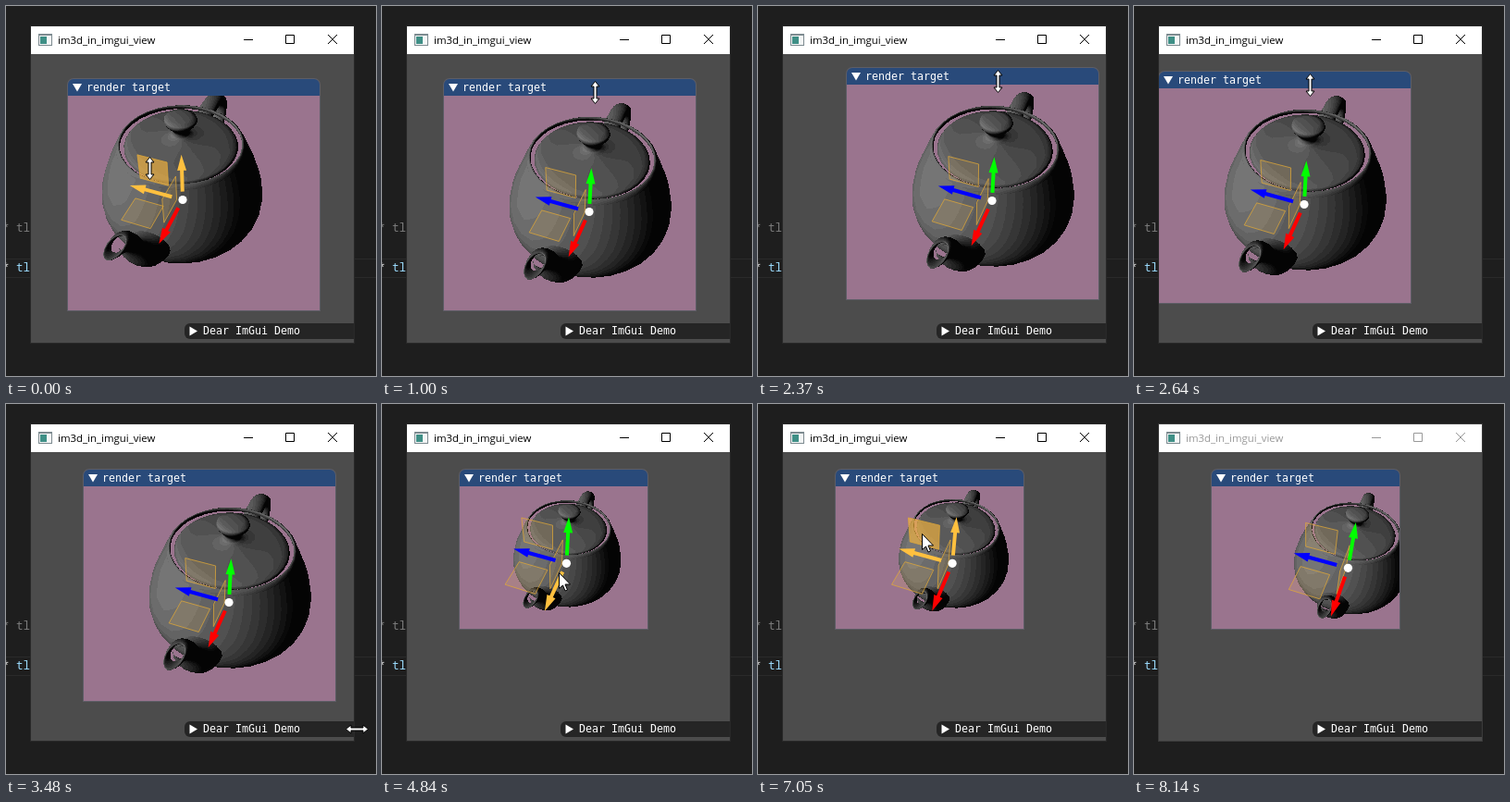
Animation of 400x400 px, one loop 8240 ms. Source, as an HTML page with a canvas:

```html
<!DOCTYPE html>
<html lang="en">
<head>
<meta charset="utf-8">
<title>im3d_in_imgui_view</title>
<style>
html, body { margin: 0; width: 100%; height: 100%; overflow: hidden; background: #1e1e1e; }
#stage { position: relative; width: 400px; height: 400px; overflow: hidden; background: #1e1e1e; }
#stage div, #stage svg, canvas { position: absolute; }
.code { left: -4px; font: 12.5px/20px "Noto Sans Mono", monospace; white-space: pre; color: #d4d4d4; }
.code b { font-weight: 400; color: #9cdcfe; }
.dim { color: #7c7c7c; }
#line { left: -2px; top: 273px; width: 404px; height: 19px; border: 1px solid #2a2a2a; }
#win { left: 27px; top: 22px; width: 349px; height: 342px; background: #4c4c4c; box-shadow: 0 0 0 1px #2a2a2a; }
#bar { left: 0; top: 0; width: 349px; height: 30px; background: #fff; color: #000; }
#bar div { left: 29px; top: 0; font: 11.4px/30px "Open Sans", sans-serif; white-space: nowrap; }
#win.idle { box-shadow: 0 0 0 1px #3c3c3c; }
#win.idle #bar { color: #999; }
#client { left: 0; top: 30px; width: 349px; height: 312px; overflow: hidden; }
.ui { font: 11.63px/18px "DejaVu Sans Mono", monospace; color: #fff; white-space: nowrap; }
#panel { border-radius: 6px 6px 0 0; overflow: hidden; background: #294a7a; box-shadow: 0 0 0 1px rgba(110, 110, 128, .5); }
#panel canvas { left: 0; top: 18px; }
#panel div, #demo div { left: 20px; top: 0; }
#demo { left: 166px; top: 291px; width: 220px; height: 17px; line-height: 17px; border-radius: 6px; background: #252525; }
.tri { left: 0; top: 0; fill: #fff; }
#cursor { left: 0; top: 0; }
</style>
</head>
<body>
<div id="stage">
  <div id="line"></div>
  <div class="code dim" style="top:230px">* tl</div>
  <div class="code" style="top:273px">* <b>tl</b></div>
  <div id="win">
    <div id="bar">
      <svg width="349" height="30" fill="none" stroke="currentColor">
        <g stroke="none">
          <path fill="#7d8b90" d="M8 8h15v13h-15z"/>
          <path fill="#f4f6f6" d="M9 10h13v10h-13z"/>
          <path fill="#3f8f86" d="M10 11h7v8h-7z"/>
        </g>
        <path d="M230 14.5h10M275.5 9.5h9v9h-9zM321 9l10 10M331 9l-10 10"/>
      </svg>
      <div>im3d_in_imgui_view</div>
    </div>
    <div id="client">
      <div id="panel" class="ui">
        <svg class="tri" width="18" height="18"><path d="M5 5h10l-5 8.5z"/></svg>
        <div>render target</div>
        <canvas id="view"></canvas>
      </div>
      <div id="demo" class="ui">
        <svg class="tri" width="18" height="17"><path d="M5.5 3.5v10l8.5-5z"/></svg>
        <div>Dear ImGui Demo</div>
      </div>
    </div>
  </div>
  <svg id="cursor" width="400" height="400"><path id="hand" fill="#fff" stroke="#000"/></svg>
</div>
<script>
const LOOP = 8240, IDLE = 8140, STEP = 90, TITLE = 18, FULL = 232;
const $ = id => document.getElementById(id);

// Mouse strokes: first and last update, what is dragged, distance, changes of hover and pointer.
const STROKES = [
  [180, 630, "pot", 33, 13],
  [720, 1000, "", 42, -95, { hover: "" }],
  [1090, 1450, "panel", 65, -2],
  [1540, 1770, "panel", -4, -5],
  [1860, 2130, "panel", -11, -17],
  [2280, 2370, "panel", -21, 12],
  [2460, 2640, "panel", -69, 4],
  [2820, 3120, "panel", 57, 0],
  [3210, 3480, "", 132, 266, { shape: "ew" }],
  [3570, 3840, "", -22, -30, { shape: "nwse" }],
  [4210, 4480, "size", -69, -78],
  [4660, 4840, "", -97, -61, { shape: "arrow", hover: "x" }],
  [4930, 5020, "", -3, -8, { hover: "z" }],
  [5200, 5470, "pot", -52, -16],
  [5650, 5830, "pot", 35, 11],
  [5920, 6050, "pot", -15, -5],
  [6140, 6230, "", 4, -22],
  [6510, 6780, "", -26, -12, { hover: "yz" }],
  [6960, 7140, "pot", 64, 15],
  [7420, 7800, "", 172, 268, { hover: "" }]
];

// Replays all strokes up to time t; the pot is kept in units of the full-size panel.
function stateAt(t) {
  const s = { cursor: [155, 175], panel: [67, 79], size: [272, 250], pot: [-12, -3.5],
    hover: "yz", shape: "ns", idle: t >= IDLE };
  for (const [from, to, what, dx, dy, change] of STROKES) {
    if (t < from) break;
    const gaps = Math.round((to - from) / STEP);
    const done = Math.min(1, (Math.floor((t - from) * gaps / (to - from) + 1e-6) + 1) / (gaps + 1));
    const scale = what === "pot" ? (s.size[1] - TITLE) / FULL : 1;
    const move = (p, k) => [p[0] + dx * done / k, p[1] + dy * done / k];
    s.cursor = move(s.cursor, 1);
    if (what) s[what] = move(s[what], scale);
    Object.assign(s, change);
  }
  return s;
}

// Camera
const DIST = 450, YAW = 20.5 * Math.PI / 180, PITCH = 47 * Math.PI / 180;
const sa = Math.sin(YAW), ca = Math.cos(YAW), sp = Math.sin(PITCH), cp = Math.cos(PITCH);
const LIGHT = [-.65, .15, .75];
function toView([x, y, z]) {
  const h = ca * x - sa * z;
  return [-sa * x - ca * z, cp * y - sp * h, sp * y + cp * h];
}
// Point of the plane x = 0 seen at a given offset from the view centre.
function unproject([ox, oy]) {
  let v = [0, 0, 0];
  for (let i = 0; i < 5; i++) {
    const q = 1 - v[2] / DIST, z = -ox * q / ca;
    v = toView([0, (-oy * q - sp * sa * z) / cp, z]);
  }
  return v;
}

// Teapot
const UNIT = 42.4, BASE = .58;
const verts = [], tris = [];
const sub = (a, b) => a.map((v, i) => v - b[i]);
const cross = (a, b) => [a[1] * b[2] - a[2] * b[1], a[2] * b[0] - a[0] * b[2], a[0] * b[1] - a[1] * b[0]];
const bez = (c, t) => [0, 1].map(k => {
  const s = 1 - t;
  return s * s * s * c[0][k] + 3 * s * s * t * c[1][k] + 3 * s * t * t * c[2][k] + t * t * t * c[3][k];
});

function surface(at, nu, nv) {
  const start = verts.length, e = 1e-4, row = nv + 1;
  for (let i = 0; i <= nu; i++) for (let j = 0; j <= nv; j++) {
    const u = i / nu, v = j / nv, p = at(u, v);
    const n = toView(cross(sub(at(u, v + e), p), sub(at(u + e, v), p)));
    const lit = n.reduce((s, c, k) => s + c * LIGHT[k], 0) / (Math.hypot(...n) || 1);
    const [x, y, z] = toView([p[0] * UNIT, (p[1] - BASE) * UNIT, p[2] * UNIT]);
    verts.push({ x, y, z, lit });
    if (i < nu && j < nv) {
      const a = start + i * row + j, b = a + row;
      tris.push([a, a + 1, b + 1], [a, b + 1, b]);
    }
  }
}
function lathe(steps, ...curve) {
  surface((u, v) => {
    const [r, y] = bez(curve, u), th = v * 2 * Math.PI;
    return [(r + .001) * Math.cos(th), y, (r + .001) * Math.sin(th)];
  }, steps, 32);
}
function tube(w0, w1, inner, outer) {
  surface((u, v) => {
    const a = bez(inner, u), b = bez(outer, u), th = v * 2 * Math.PI, c = Math.cos(th);
    const mix = k => (a[k] + b[k]) / 2 + (b[k] - a[k]) / 2 * c;
    return [mix(0), mix(1), -(w0 + (w1 - w0) * u) * Math.sin(th)];
  }, 14, 16);
}
lathe(6, [1.38, 2.4], [1.32, 2.53], [1.41, 2.53], [1.46, 2.4]);  // rim
lathe(16, [1.46, 2.4], [1.93, 1.5], [2.35, .5], [1.5, .15]);     // body
lathe(8, [0, 3.15], [.8, 3.15], [0, 2.85], [.2, 2.7]);           // knob
lathe(8, [.2, 2.7], [.4, 2.55], [1.28, 2.55], [1.28, 2.4]);      // lid
tube(.22, .22, [[-1.6, 2.025], [-3.05, 2.1], [-3.05, 1.3], [-2, .9]],
  [[-1.5, 2.25], [-3.5, 2.5], [-3.4, 1.05], [-1.9, .6]]);        // handle
tube(.5, .2, [[1.7, 1.425], [2.6, 1.425], [2.3, 2.1], [2.7, 2.4]],
  [[1.7, .6], [3.1, .825], [2.4, 2.025], [3.3, 2.4]]);           // spout
tube(.2, .12, [[2.7, 2.4], [2.8, 2.475], [2.9, 2.475], [2.8, 2.4]],
  [[3.3, 2.4], [3.525, 2.494], [3.45, 2.5125], [3.2, 2.4]]);     // lip

const view = $("view"), ctx = view.getContext("2d");
const grey = g => (255 << 24 | g << 16 | g << 8 | g) >>> 0;
const PINK = 0xff8e749a;

function drawPot(pos, project, W, H) {
  const img = ctx.createImageData(W, H);
  const px = new Uint32Array(img.data.buffer).fill(PINK), near = new Float32Array(W * H);
  const pts = verts.map(v => project([v.x + pos[0], v.y + pos[1], v.z + pos[2]]));
  for (const [i, j, k] of tris) {
    const a = pts[i], b = pts[j], c = pts[k];
    const bx = b[0] - a[0], by = b[1] - a[1], cx = c[0] - a[0], cy = c[1] - a[1];
    const area = bx * cy - by * cx;
    if (area >= 0) continue; // facing away
    const range = (n, max) => [Math.max(0, Math.floor(Math.min(a[n], b[n], c[n]))),
      Math.min(max - 1, Math.max(a[n], b[n], c[n]))];
    const [x0, x1] = range(0, W), [y0, y1] = range(1, H);
    const la = verts[i].lit, lb = verts[j].lit - la, lc = verts[k].lit - la;
    for (let y = y0; y <= y1; y++) for (let x = x0; x <= x1; x++) {
      const dx = x + .5 - a[0], dy = y + .5 - a[1];
      const s = (dx * cy - dy * cx) / area, t = (bx * dy - by * dx) / area;
      if (s < 0 || t < 0 || s + t > 1) continue;
      const d = a[2] + s * (b[2] - a[2]) + t * (c[2] - a[2]), o = y * W + x;
      if (d <= near[o]) continue;
      near[o] = d;
      px[o] = grey(Math.max(4, Math.floor((la + s * lb + t * lc) * 125 / 9) * 9));
    }
  }
  ctx.putImageData(img, 0, 0);
}

// Move gizmo, constant size on screen
const AXES = { x: [1, 0, 0], y: [0, 1, 0], z: [0, 0, 1] };
const TINT = { x: "#f00", y: "#0f0", z: "#00f" }, GOLD = "#ffc03f";

function drawGizmo(pos, project, hover) {
  const o = project(pos), size = 63.5 / o[2];
  const at = (...parts) => {
    const w = [0, 0, 0];
    for (const [axis, f] of parts) AXES[axis].forEach((v, k) => w[k] += v * f * size);
    return project(toView(w).map((v, k) => v + pos[k]));
  };
  const fill = (points, style) => {
    ctx.beginPath();
    for (const p of points) ctx.lineTo(p[0], p[1]);
    ctx.closePath();
    ctx.fillStyle = style;
    ctx.fill();
  };
  const lo = .25, hi = .77;
  for (const [a, b] of ["xz", "xy", "yz"]) {
    const quad = [[lo, lo], [hi, lo], [hi, hi], [lo, hi]].map(([f, g]) => at([a, f], [b, g]));
    fill(quad, hover === a + b ? "rgba(255,186,60,.62)" : "rgba(255,200,90,.14)");
    ctx.strokeStyle = "rgba(225,168,55,.75)";
    ctx.lineWidth = 1;
    ctx.stroke();
  }
  for (const axis of "zyx") {
    const s = at([axis, .2]), e = at([axis, 1]);
    const len = Math.hypot(e[0] - s[0], e[1] - s[1]), ux = (e[0] - s[0]) / len, uy = (e[1] - s[1]) / len;
    const pt = (d, n) => [s[0] + ux * d - uy * n, s[1] + uy * d + ux * n];
    const neck = len - 17;
    fill([pt(0, 2), pt(neck, 2), pt(neck, 5), pt(len, 0), pt(neck, -5), pt(neck, -2), pt(0, -2)],
      hover.includes(axis) ? GOLD : TINT[axis]);
  }
  ctx.beginPath();
  ctx.arc(o[0], o[1], 4.6, 0, 7);
  ctx.fillStyle = "#fff";
  ctx.fill();
}

const TURN = { ns: 0, ew: 90, nwse: -45, arrow: 0 };
const DOUBLE = "M0-12L4.5-6.5H1.5V6.5H4.5L0 12L-4.5 6.5H-1.5V-6.5H-4.5Z";
const ARROW = "M0 0V17L4 13.5L6.5 19.5L9 18.5L6.5 12.5H12Z";

function draw(s) {
  const [x, y] = s.panel.map(Math.round), [W, h] = s.size.map(Math.round), H = h - TITLE;
  Object.assign($("panel").style, { left: x - 27 + "px", top: y - 52 + "px", width: W + "px", height: h + "px" });
  view.width = W;
  view.height = H;
  const project = p => {
    const k = DIST * H / FULL / (DIST - p[2]);
    return [W / 2 + p[0] * k, H / 2 - p[1] * k, k];
  };
  const pos = unproject(s.pot);
  drawPot(pos, project, W, H);
  drawGizmo(pos, project, s.hover);

  const [cx, cy] = s.cursor.map(v => Math.round(v) + .5);
  $("hand").setAttribute("d", s.shape === "arrow" ? ARROW : DOUBLE);
  $("hand").setAttribute("transform", `translate(${cx} ${cy}) rotate(${TURN[s.shape]})`);
  $("win").className = s.idle ? "idle" : "";
}

const begin = performance.now();
let shown = "";
function tick() {
  const s = stateAt((performance.now() - begin) % LOOP), key = JSON.stringify(s);
  if (key !== shown) draw(s);
  shown = key;
  requestAnimationFrame(tick);
}
tick();
</script>
</body>
</html>
```
